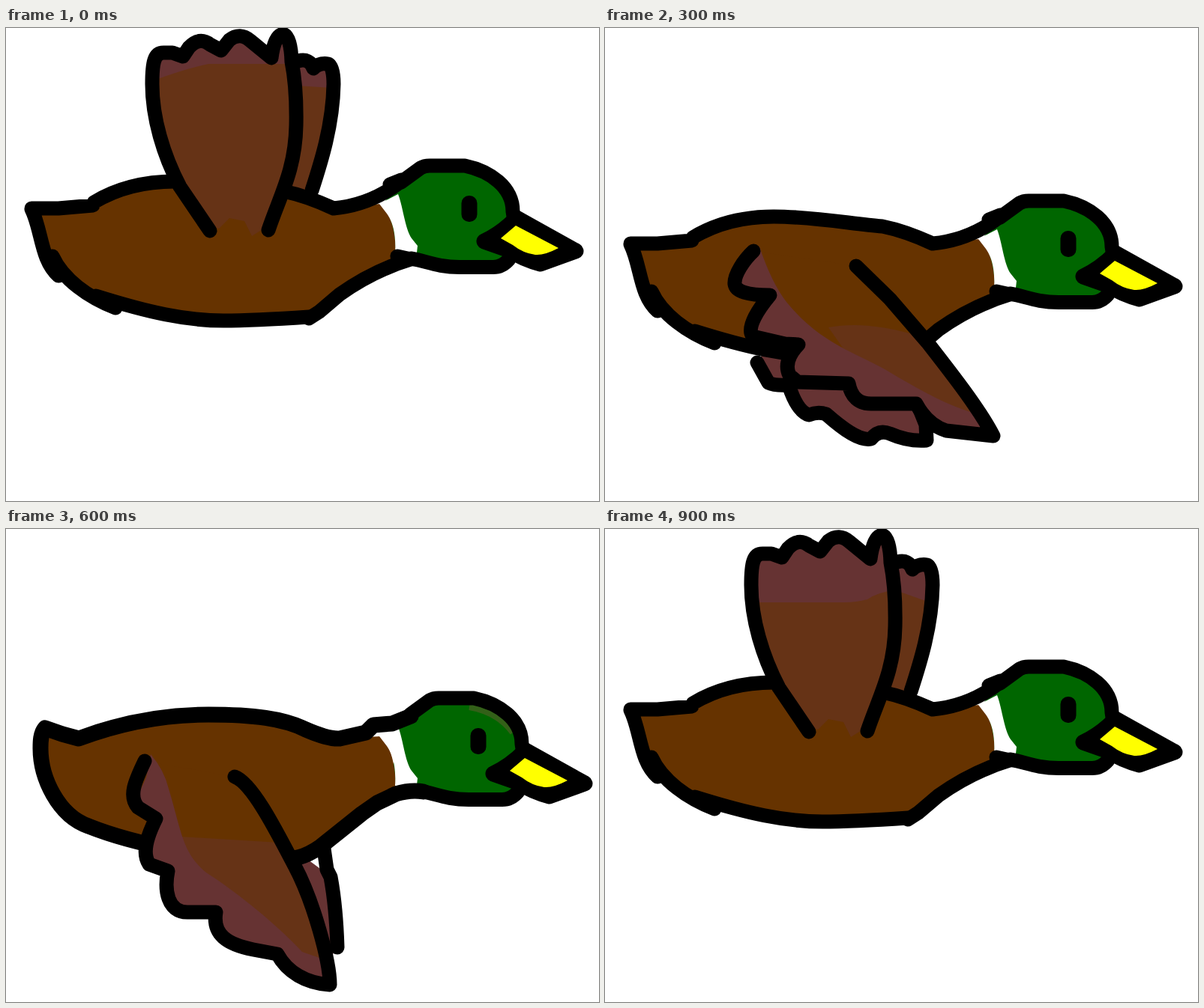
An HTML page for the animation above (0.93 s loop, 791x632 px).

```html
<!DOCTYPE html>
<html lang="en">
<head>
<meta charset="utf-8">
<title>Flying duck</title>
<style>
html, body { margin: 0; width: 100%; height: 100%; overflow: hidden; background: #fff; }
svg { display: block; width: 100vw; height: 100vh; }
.ink { fill: none; stroke: #000; stroke-width: 19; stroke-linecap: round; stroke-linejoin: round; }
.bold { stroke-width: 21; }
.body { fill: #630; }
.wing { fill: #663316; }
.tip { fill: #633; }
.pose, .duck { visibility: hidden; }
.on { visibility: visible; }
.rise .down, svg:not(.rise) .up { display: none; }
</style>
</head>
<body>
<svg id="stage" viewBox="0 0 791 632">
  <defs>
    <path id="crown" fill="#060" d="M505 232L530 206L555 185L612 184C645 190 677 212 677 245L678 300L650 320H600L545 308H505Z"/>
    <path id="collar" fill="#fff" d="M498 235L523 222C530 240 532 268 541 281L549 291L548 300L519 301C521 270 513 255 508 248Z"/>
    <g id="face">
      <path class="ink" d="M527 206L553 187Q558 184 565 184H612C645 191 676 212 676 245L678 258M540 308C560 311 575 319.500 605 319.500H650Q662 319.500 671 309"/>
      <path class="ink bold" style="fill:#000" d="M681 254L760 298Q735 307 713 315Q690 309 672 297L638 285Q660 275 681 254Z"/>
      <path fill="#ff0" d="M680 264L737 294Q718 304 706 303Q690 301 676 290L660 281Z"/>
      <rect x="607.500" y="224" width="21" height="35" rx="10"/>
    </g>
  </defs>

  <!-- far wings -->
  <g class="pose high">
    <path class="wing" d="M380 45L437 55C438 130 420 180 410 222L380 222Z"/>
    <path class="tip down" d="M380 45L437 50L434 80L388 77Z"/>
    <path class="tip up" d="M380 45L437 50L433 98L388 82Z"/>
    <path class="ink" d="M390 44Q405 40 410 54Q418 46 430 48Q437 52 437 75C436 130 420 180 408 217"/>
  </g>
  <g class="pose fore">
    <path class="tip" d="M203 447L212 433H300L418 505L430 550L380 542L355 550L295 517L272 517L250 482L218 475Z"/>
    <path class="ink" d="M203 447L218 474Q226 478 245 477Q256 512 272 517Q284 512 295 516C320 538 340 552 355 549Q365 536 380 542Q405 553 429 551L428 530L418 505"/>
  </g>
  <g class="pose low">
    <path class="tip" d="M384 468L403 455L430 475L440 573L432 590Z"/>
    <path class="ink" d="M424 440L428 468L433 478C438 505 441 540 442 572"/>
  </g>

  <g class="duck" id="duckA">
    <use href="#crown"/>
    <path class="body" d="M40 243L116 236C150 213 185 205 225 205C280 205 330 215 370 218L437 240L500 235Q520 255 520 305L480 333L415 382C370 389 330 391 290 391C240 391 190 382 146 374C110 360 80 340 64 312Z"/>
    <use href="#collar"/>
    <path class="ink" d="M34 241H70L116 237M117 233C150 213 185 205 225 205C280 205 330 215 370 218Q400 224 437 241C470 238 500 226 527 205M512 209L527 203M34 242C48 270 46 310 70 331M62 305C76 336 110 360 146 374M120 358C190 380 240 391 290 391Q330 391 404 386M404 388L418 379L445 356Q490 324 540 309L522 305"/>
    <use href="#face"/>
  </g>

  <g class="duck" id="duckB">
    <use href="#crown" x="12"/>
    <g transform="translate(0 -19)">
      <path class="body" d="M50 245L97 257C150 237 210 225 270 225C330 225 370 230 400 245L440 257L500 254Q520 274 520 327L475 358L420 401C400 415 385 420 350 419C270 418 170 398 110 374C70 360 46 310 46 270Z"/>
    </g>
    <use href="#collar"/>
    <path fill="none" stroke="#336018" stroke-width="8" d="M618 196Q655 202 676 230"/>
    <g transform="translate(0 -19)">
      <path class="ink bold" d="M97 257C150 237 210 225 270 225C330 225 370 230 400 245Q430 258 445 257L480 249L490 239L515 237L540 227M97 257L75 251L52 243C46 250 46 262 46 270C46 310 70 360 110 374C170 398 270 418 350 419C385 420 400 415 420 401L445 381L475 357L495 343L520 331Q540 325 557 328"/>
    </g>
    <use href="#face" x="12"/>
  </g>

  <!-- near wings -->
  <g class="pose high">
    <path class="wing" d="M272 265L232 212C210 170 195 120 195 75L200 36L222 33L236 39L258 16L287 31L312 8L354 41L370 8L381 45Q388 80 387 130C386 190 365 225 350 264L328 278L318 258L298 254L284 268Z"/>
    <path class="tip down" d="M197 70L200 36L222 33L236 39L258 16L287 31L312 8L354 41L370 8L381 48H270Q240 54 197 70Z"/>
    <path class="tip up" d="M197 98L200 36L222 33L236 39L258 16L287 31L312 8L354 41L370 8L381 45L386 82Q365 84 350 94Q335 98 320 98Z"/>
    <path class="ink" d="M272 271L232 212C210 170 195 120 195 75C195 45 198 33 210 33H222L236 38L244 26Q258 11 272 22L287 30L298 16Q312 5 326 17L354 40Q358 9 370 8Q380 12 381 45Q388 80 387 130C386 190 365 225 350 270"/>
  </g>
  <g class="pose half">
    <path class="wing" d="M412 143L460 147L468 165L480 202L390 252Z"/>
    <path class="tip" d="M412 150L460 147L468 165L480 202L441 218L427 185Z"/>
    <path class="ink" d="M415 141L440 147H458Q469 152 467 164L464 185L480 201Q475 212 440 228L390 252"/>
    <path class="wing" d="M220 258L232 220C245 180 270 145 310 127C340 110 370 104 387 106L386 130L408 145V176L425 178L400 215Q380 246 355 262L318 268L300 260L280 240L252 262Z"/>
    <path class="tip down" d="M312 130Q350 106 387 106L386 130L408 145V176L425 178L388 226Q352 160 312 130Z"/>
    <path class="tip up" d="M331 118Q360 106 387 106L386 130L408 145V176L425 178L394 212Q352 165 331 118Z"/>
    <path class="ink" d="M205 290L232 220C245 180 270 145 310 127C340 110 370 104 387 106L385 120L372 136L385 128L402 134L408 145V176L425 178L400 215C375 255 350 283 318 298"/>
  </g>
  <g class="pose fore">
    <path class="body" d="M198 298C185 310 172 330 173 342L222 357L194 408L258 423L246 465L325 475L355 502H415L455 540L518 545Q480 480 430 420L335 318Z"/>
    <path class="wing" d="M298 400Q350 390 420 412L518 545L340 460Z"/>
    <path class="tip" d="M206 292Q222 340 242 366C290 425 340 435 380 460C420 484 470 512 508 518L518 545L455 540L415 502H355L325 475L246 465L258 423L194 408L222 357L173 342C172 330 185 310 198 298Z"/>
    <path class="ink" d="M198 298C185 310 172 330 173 342Q175 357 220 357C205 375 188 400 197 412L240 422L258 423Q237 445 246 464L257 473L325 475Q330 502 355 502H415Q430 530 455 538L518 545C500 510 465 465 430 420L380 362L335 318"/>
  </g>
  <g class="pose low">
    <path class="body" d="M185 323C172 350 165 370 175 385L200 400L192 460L215 470L240 525H280L330 575L362 583L432 622C432 590 410 510 385 463C360 415 325 358 305 344Z"/>
    <path class="wing" d="M232 424L365 432C405 520 432 560 432 600L380 590L260 490Z"/>
    <path class="tip" d="M193 314Q211 335 217 360C235 420 235 445 267 472C308 498 365 545 395 578L424 588L432 622C400 620 375 605 362 581L330 575C295 568 275 555 280 525H242C215 525 211 495 216 470L192 460L200 400L172 378L187 345Z"/>
    <path class="ink" d="M185 323C172 350 163 370 176 385L200 400C190 420 180 445 191 461L216 470C211 495 215 525 242 525H280C275 555 295 568 330 575L362 581C375 605 400 620 432 622C432 590 410 510 385 463C360 415 328 352 305 344"/>
  </g>
  <g class="pose fold">
    <path class="tip" d="M250 303Q275 340 310 358Q350 374 395 376L408 398H258L290 378L215 353L190 335Q210 312 250 303Z"/>
    <path class="ink" d="M240 320L244 305C215 305 190 320 186 333Q195 350 215 353L257 355L215 360Q203 368 204 384H255L297 375L258 393L402 397M303 295C330 303 380 350 408 392"/>
  </g>
</svg>
<script>
const stage = document.getElementById('stage');
const ducks = [...document.querySelectorAll('.duck')];
const poses = [...document.querySelectorAll('.pose')];
const STEP = 30, COUNT = 31;
// name and the first step after the pose
const cycle = [['high', 2], ['half', 7], ['fore', 14], ['low', 21], ['fold', 25], ['half', 29], ['high', COUNT]];
let last = -1;

function show(k) {
  const i = cycle.findIndex(c => k < c[1]);
  const name = cycle[i][0];
  const drop = Math.min(4.7 * k, 4.2 * (30 - k));
  const lift = name === 'low' ? -4.2 * Math.max(0, k - 17) : 0;
  stage.classList.toggle('rise', k > 15);
  ducks.forEach((duck, n) => {
    duck.classList.toggle('on', i % 2 === n);
    duck.setAttribute('transform', `translate(0 ${Math.round(drop)})`);
  });
  for (const p of poses) {
    p.classList.toggle('on', p.classList.contains(name));
    p.setAttribute('transform', `translate(0 ${Math.round(lift)})`);
  }
}

const start = performance.now();
function tick() {
  const k = Math.floor((performance.now() - start) / STEP) % COUNT;
  if (k !== last) show(last = k);
  requestAnimationFrame(tick);
}
tick();
</script>
</body>
</html>
```
